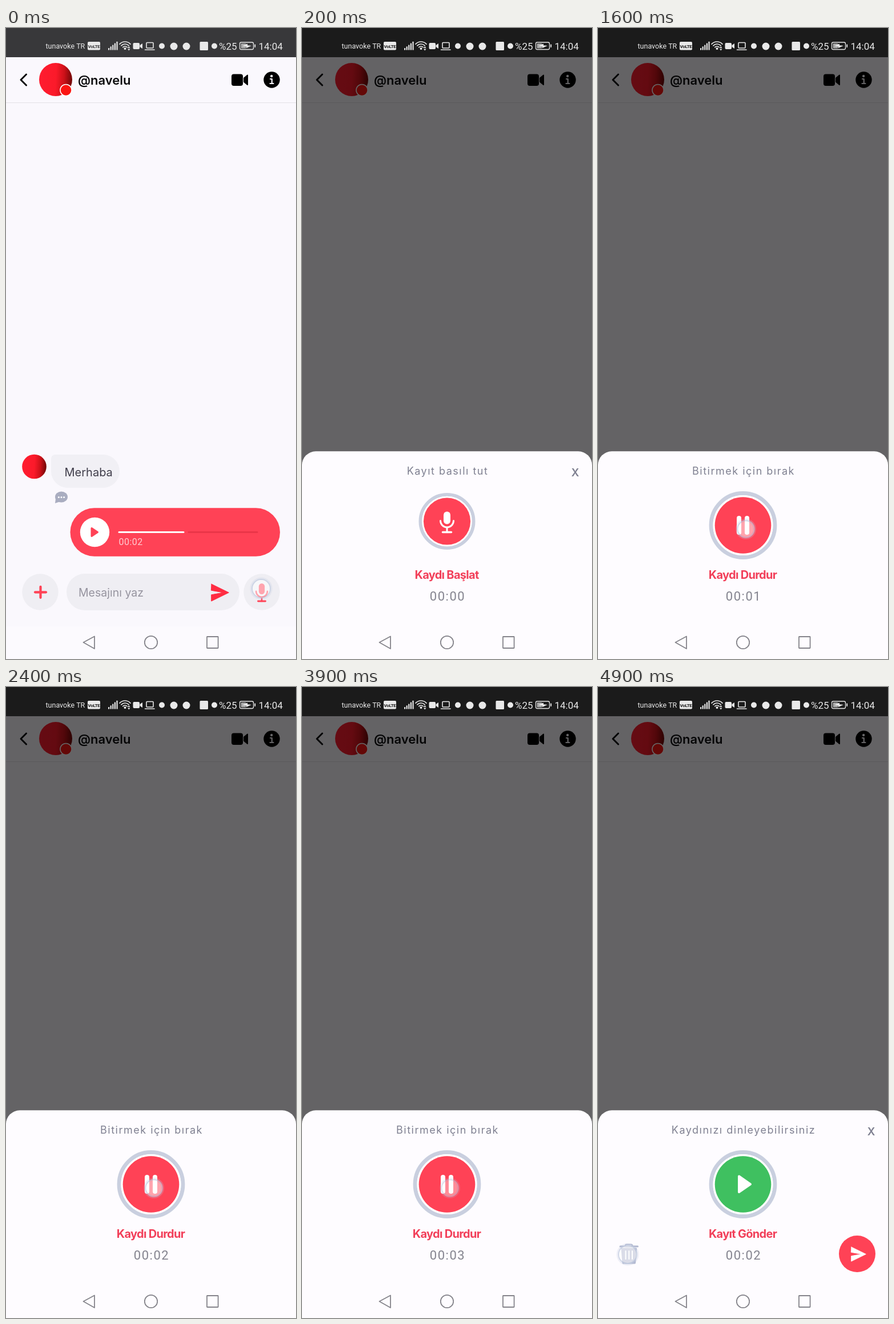
Animation of 508x1102 px, one loop 5000 ms. Source, as an HTML page with a canvas:

```html
<!DOCTYPE html>
<html lang="tr">
<head>
<meta charset="utf-8">
<title>Sesli mesaj</title>
<style>
html, body { margin: 0; width: 100%; height: 100%; overflow: hidden; background: #faf8fd; }
canvas { display: block; width: 508px; height: 1102px; }
</style>
</head>
<body>
<canvas id="stage" width="508" height="1102"></canvas>
<script>
const c = document.getElementById('stage').getContext('2d');
const LOOP = 5000, STEP = 100;
const RED = '#ff4256', PAPER = '#faf8fd', FIELD = '#efeef3', SHEET = '#fefcff';
const RING = '#c9cfdf', GREY = '#7f8091', GREEN = '#3fc060', LIGHT = '#e9e9e9';
const INTER = 'Inter, sans-serif', ROBOTO = 'Roboto, sans-serif';

function disc(x, y, r, fill) {
  c.fillStyle = fill;
  c.beginPath();
  c.arc(x, y, r, 0, Math.PI * 2);
  c.fill();
}

function ring(x, y, r, color, width) {
  c.strokeStyle = color;
  c.lineWidth = width;
  c.beginPath();
  c.arc(x, y, r, 0, Math.PI * 2);
  c.stroke();
}

function box(x, y, w, h, r, fill) {
  c.fillStyle = fill;
  c.beginPath();
  c.roundRect(x, y, w, h, r);
  c.fill();
}

function frame(x, y, w, h, r, color, width) {
  c.strokeStyle = color;
  c.lineWidth = width;
  c.beginPath();
  c.roundRect(x, y, w, h, r);
  c.stroke();
}

function path(points, closed) {
  c.beginPath();
  points.forEach(([x, y]) => c.lineTo(x, y));
  if (closed) c.closePath();
}

function line(points, color, width, cap = 'round') {
  path(points);
  c.strokeStyle = color;
  c.lineWidth = width;
  c.lineCap = cap;
  c.lineJoin = 'round';
  c.stroke();
}

// Filled polygon; a non-zero round softens its corners.
function poly(points, fill, round = 0) {
  path(points, true);
  c.fillStyle = fill;
  c.fill();
  if (!round) return;
  c.strokeStyle = fill;
  c.lineWidth = round;
  c.lineJoin = 'round';
  c.stroke();
}

function text(str, x, y, font, fill, spacing = 0, align = 'left') {
  c.font = font;
  c.fillStyle = fill;
  c.textAlign = align;
  c.letterSpacing = spacing + 'px';
  c.fillText(str, x, y);
}

function at(x, y, scale, draw) {
  c.save();
  c.translate(x, y);
  c.scale(scale, scale);
  draw();
  c.restore();
}

function avatar(x, y, r) {
  const g = c.createLinearGradient(x - r, y, x + r, y + r * 0.1);
  g.addColorStop(0, '#ff1c30');
  g.addColorStop(0.5, '#fb1a2a');
  g.addColorStop(0.75, '#cc1119');
  g.addColorStop(1, '#6e0606');
  disc(x, y, r, g);
}

function mic(x, y, scale, color) {
  at(x, y, scale, () => {
    box(-6, -18, 12, 22, 6, color);
    c.strokeStyle = color;
    c.lineWidth = 3;
    c.lineCap = 'round';
    c.beginPath();
    c.arc(0, -2, 11.5, 0, Math.PI);
    c.stroke();
    line([[0, 10], [0, 18]], color, 3);
    line([[-7.5, 18], [7.5, 18]], color, 3.4);
  });
}

function plane(x, y, scale, color) {
  at(x, y, scale, () => poly(
    [[-15.3, -15], [15.3, 0], [-15.3, 15], [-15.3, 3.8], [6, 0], [-15.3, -3.8]], color, 1));
}

function touch(x, y, r, alpha) {
  c.save();
  c.globalAlpha *= alpha;
  ring(x, y, r + 1.5, 'rgba(190,198,222,.25)', 4);
  ring(x, y, r, 'rgba(196,205,226,.7)', 2);
  disc(x, y, r - 1, 'rgba(255,255,255,.52)');
  c.restore();
}

function statusBar(shade) {
  box(0, 0, 508, 51, 0, shade);
  text('tunavoke TR', 69.5, 36, '12.5px ' + ROBOTO, LIGHT);
  box(143, 24, 22, 14.5, 2, LIGHT);
  text('VoLTE', 154, 34.8, '700 8px ' + ROBOTO, shade, -0.3, 'center');
  for (let i = 0; i < 5; i++) {
    const h = 3.5 + i * 2.8;
    box(179 + i * 3.6, 38.5 - h, 2.2, h, 0.5, LIGHT);
  }
  c.strokeStyle = LIGHT;
  c.lineWidth = 1.7;
  c.lineCap = 'round';
  [5, 9, 13].forEach(r => {
    c.beginPath();
    c.arc(208.5, 37, r, -Math.PI * 0.76, -Math.PI * 0.24);
    c.stroke();
  });
  disc(208.5, 36, 2, LIGHT);
  poly([[213, 35], [217.5, 35], [215.2, 32]], LIGHT);
  poly([[213, 36.5], [217.5, 36.5], [215.2, 39.5]], LIGHT);
  box(222.5, 26, 11.5, 11, 2, LIGHT);
  poly([[234.5, 30], [239, 27], [239, 36], [234.5, 33]], LIGHT);
  frame(246, 25.5, 12, 9.5, 1, LIGHT, 1.6);
  line([[243.5, 38], [260, 38]], LIGHT, 1.6);
  disc(273, 31.5, 5, LIGHT);
  disc(294, 32, 6.5, LIGHT);
  disc(316, 32, 6.5, LIGHT);
  box(339.5, 24, 14.5, 15, 1.5, LIGHT);
  disc(365, 31.5, 5, LIGHT);
  text('%25', 373, 37.8, '17px ' + ROBOTO, LIGHT);
  frame(409.5, 25, 24, 12.5, 2.5, LIGHT, 1.3);
  box(411.5, 27, 9, 8.5, 1, '#a8a8a8');
  poly([[414, 31.5], [423, 27.5], [423, 30.2], [430, 31], [421, 35], [421, 32.4]], LIGHT);
  box(435.3, 28.5, 1.8, 5.5, 0.8, LIGHT);
  text('14:04', 442.5, 37.8, '17px ' + ROBOTO, LIGHT);
}

function header() {
  box(0, 130, 508, 1, 0, '#e3e1e7');
  line([[35.5, 81], [26, 90.5], [35.5, 100]], '#08080a', 3);
  avatar(87, 90, 29);
  disc(105, 108.5, 10.8, '#fff');
  disc(105, 108.5, 9.3, '#fb1512');
  text('@navelu', 126, 99, '600 22px ' + INTER, '#0a0a0c');
  box(395, 80.5, 20, 20.5, 4, '#000');
  poly([[417, 87.5], [423, 82.5], [423, 99], [417, 94]], '#000', 2);
  disc(465.5, 90.5, 14.2, '#000');
  disc(465.2, 84, 2.2, PAPER);
  line([[463, 89], [465.8, 89], [465.8, 97], [462.5, 97], [468.5, 97]], PAPER, 2.2);
}

function chat() {
  avatar(49.5, 766, 21.3);
  box(79, 745, 120, 58, [7, 29, 29, 29], '#f1f0f5');
  text('Merhaba', 102.5, 782.5, '20px ' + INTER, '#403e4b');

  c.fillStyle = '#a9adc0';
  c.beginPath();
  c.ellipse(97, 819, 11, 9.5, 0, 0, Math.PI * 2);
  c.fill();
  poly([[87, 822], [86, 830], [95, 827]], '#a9adc0');
  [-4.6, 0, 4.6].forEach(d => disc(97 + d, 819.5, 1.5, '#fff'));

  box(112.5, 838.3, 367.5, 84.5, 42.2, RED);
  disc(155.5, 880.5, 25.7, '#fff');
  poly([[150, 873.5], [160.5, 880.5], [150, 887.5]], RED, 3);
  line([[198, 880.5], [311, 880.5]], '#fff', 3);
  line([[320, 880.5], [440, 880.5]], '#ea3548', 3);
  text('00:02', 197.5, 903, '16px ' + ROBOTO, '#ffccd1', 0.5);
}

function composer() {
  disc(60, 985, 31.7, FIELD);
  line([[51, 985.3], [70, 985.3]], RED, 4.2);
  line([[60.5, 975.8], [60.5, 994.8]], RED, 4.2);
  box(106, 953, 303, 64, 32, FIELD);
  text('Mesajını yaz', 127, 992.5, '19.5px ' + INTER, '#96949f');
  plane(375, 986, 1, '#ff2c42');
  disc(448, 985, 31.7, FIELD);
  mic(448, 985.5, 0.86, RED);
}

// Rings do not overlap, so the button also fades evenly.
function bigButton(y, scale, fill) {
  at(254, y, scale, () => {
    ring(0, 0, 46.6, RING, 5.8);
    ring(0, 0, 42.4, '#fff', 2.8);
    disc(0, 0, 41.1, fill);
  });
}

function trash() {
  const tone = '#b1b7cf';
  line([[39, 977], [69.5, 977]], tone, 3);
  frame(48, 973.5, 12, 4, 2, tone, 2.2);
  poly([[42, 981], [66.5, 981], [64.5, 1006], [44, 1006]], tone, 3);
  [48.5, 54.3, 60].forEach(x => line([[x, 985], [x, 999]], '#fff', 2));
}

function sheet(mode, clock, tools) {
  box(0, 739.3, 508, 530, [24, 24, 0, 0], SHEET);
  const titles = {
    ready: ['Kayıt basılı tut', 'Kaydı Başlat'],
    record: ['Bitirmek için bırak', 'Kaydı Durdur'],
    review: ['Kaydınızı dinleyebilirsiniz', 'Kayıt Gönder']
  };
  const [hint, action] = titles[mode];
  text(hint, 255, 780, '18px ' + INTER, GREY, 1.5, 'center');
  if (mode !== 'record') text('X', 478.5, 783, '600 19px ' + INTER, GREY, 0, 'center');

  if (mode === 'ready') {
    bigButton(861.5, 1, RED);
    mic(254, 862.5, 1, '#fff');
  } else {
    bigButton(868.5, 1.2, mode === 'record' ? RED : GREEN);
    if (mode === 'record') {
      box(243, 852, 8, 33, 4, '#fff');
      box(257, 852, 8, 33, 4, '#fff');
    } else {
      poly([[247, 854.5], [267, 868.3], [247, 882]], '#fff', 4);
    }
  }

  text(action, 253.5, 962, '700 20px ' + INTER, '#f2405a', -0.7, 'center');
  text(clock, 255, 999.8, '22px ' + ROBOTO, '#83838e', 1.5, 'center');

  if (mode === 'review') {
    c.save();
    c.globalAlpha *= tools;
    trash();
    disc(454, 990, 32, RED);
    plane(456.5, 990.5, 0.84, '#fff');
    c.restore();
  }
}

function navBar() {
  const tone = '#85848b';
  path([[135.5, 1073], [155, 1062.5], [155, 1084]], true);
  c.strokeStyle = tone;
  c.lineWidth = 1.8;
  c.lineJoin = 'round';
  c.stroke();
  ring(254, 1073, 11.2, tone, 1.8);
  frame(352, 1063, 19.6, 20, 0.5, tone, 1.8);
}

function render(ms) {
  const t = Math.floor((ms % LOOP) / STEP) * STEP;
  const open = t >= 200 ? 1 : t / 200;
  const dim = open === 1 ? 0.6 : open * 0.4;

  box(0, 0, 508, 1102, 0, PAPER);
  box(0, 1045, 508, 57, 0, '#fcfafe');
  header();
  chat();
  composer();
  if (t === 0) {
    touch(447, 979, 16, 1);
  } else if (t === 100) {
    touch(447, 978, 14, 0.7);
  }

  if (open) {
    box(0, 0, 508, 1102, 0, `rgba(0,0,0,${dim})`);
    const mode = t < 1400 ? 'ready' : t < 4100 ? 'record' : 'review';
    const secs = t < 1500 ? 0 : t < 2400 ? 1 : t < 3400 ? 2 : t < 4100 ? 3 : 2;
    const tools = Math.min(1, (t - 4000) / 400);
    c.save();
    c.globalAlpha = open === 1 ? 1 : 0.22;
    c.translate(0, open === 1 ? 0 : 166);
    sheet(mode, '00:0' + secs, tools);
    c.restore();
  }
  if (t >= 1300 && t < 4000) touch(259, 875, 14.5, t === 3900 ? 0.75 : 1);
  if (t >= 4900) touch(52, 991, 16, 1);

  statusBar(open === 1 ? '#1b1b1b' : '#38383a');
  navBar();
}

const start = performance.now();
function tick() {
  render(performance.now() - start);
  requestAnimationFrame(tick);
}
tick();
</script>
</body>
</html>
```
